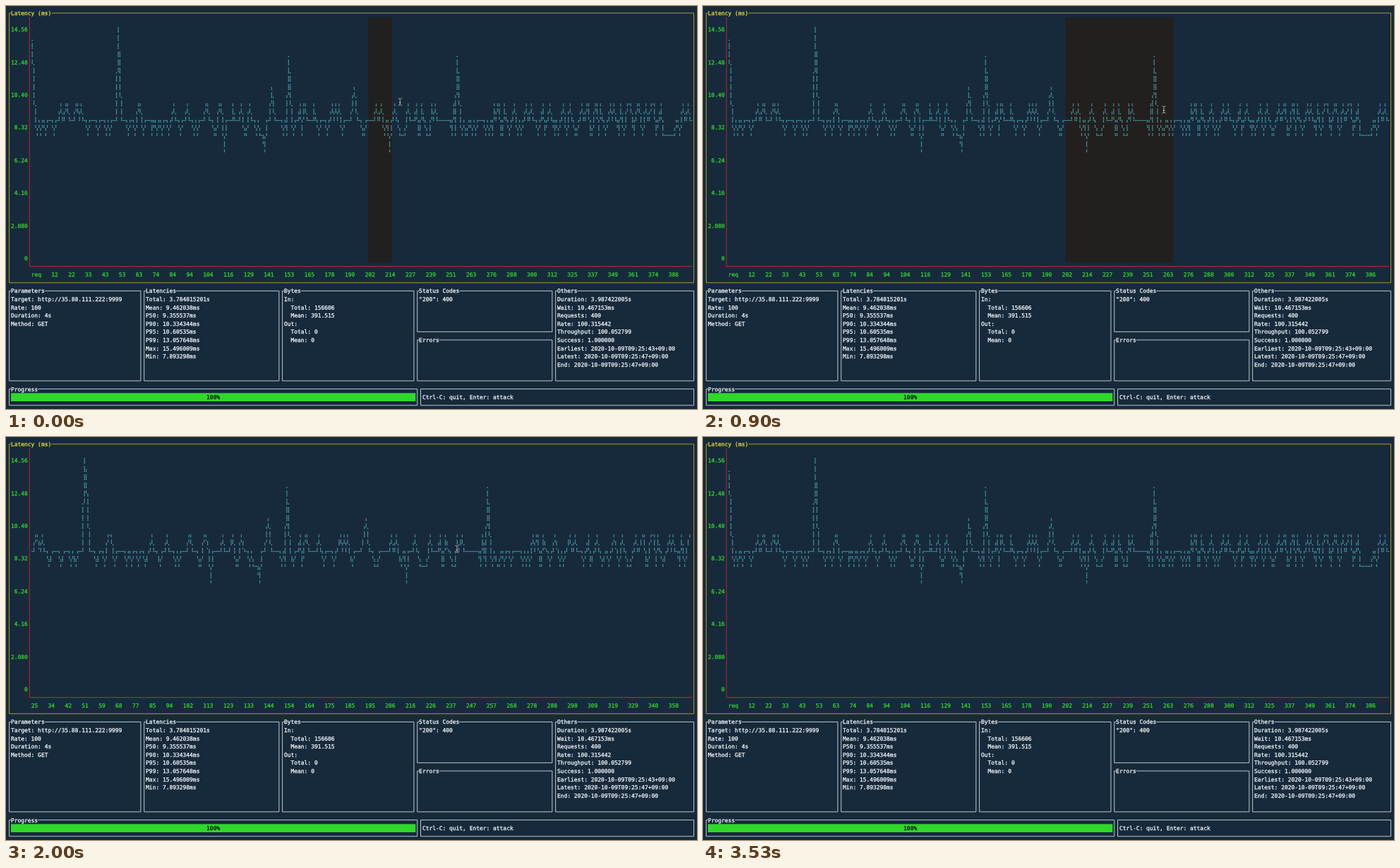
An HTML page that plays this animation: 979x572 px, repeating every 3.56 s.

```html
<!DOCTYPE html>
<html lang="en">
<head>
<meta charset="utf-8">
<title>Load test dashboard</title>
<style>
  html, body { margin: 0; width: 100%; height: 100%; overflow: hidden; background: #172a3c; }
  svg { display: block; width: 979px; height: 572px; }
  text {
    font: 7.937px "DejaVu Sans Mono", monospace;
    white-space: pre;
    text-rendering: geometricPrecision;
    stroke-width: .28px;
  }
  .white { fill: #f4f6f7; stroke: #f4f6f7; }
  .green { fill: #35d52f; stroke: #35d52f; }
  .yellow { fill: #e3dc35; stroke: #e3dc35; }
  .black { fill: #04120a; stroke: #04120a; }
  .line { fill: none; stroke: #c8d0d6; stroke-width: .95; }
  .line.gold { stroke: #b5a521; }
  .line.red { stroke: #a22b2e; stroke-width: 1.1; }
  #dots { fill: none; stroke: #5ac6ce; stroke-width: 1.5; stroke-linecap: round; }
  #cursor { fill: none; stroke: #cfd3d4; stroke-width: .9; }
  #cursor .halo { stroke: #0d1318; stroke-width: 2; }
</style>
</head>
<body>
<svg viewBox="0 0 979 572" xmlns="http://www.w3.org/2000/svg">
  <defs>
    <path id="beam" d="M-2.6-5Q-.4-5 0-3.6Q.4-5 2.6-5M0-3.6V3.8M-2.6 5Q-.4 5 0 3.8Q.4 5 2.6 5M-1.4 1.2H1.4"/>
  </defs>
  <g id="panels"></g>
  <rect id="selection" fill="#22201f"/>
  <path id="dots"/>
  <g id="axes"></g>
  <g id="ticks"></g>
  <g id="cursor"><use href="#beam" class="halo"/><use href="#beam"/></g>
</svg>
<script>
const LOOP = 3560, CW = 4.778, RH = 11.6, LEFT = 7, CELLS = 196;
const $ = id => document.getElementById(id);
const colX = c => 2.2 + c * CW;
const midX = c => colX(c + .5);
const rowY = r => 10 + r * RH;

function add(parent, tag, attrs, content) {
  const el = document.createElementNS('http://www.w3.org/2000/svg', tag);
  for (const k in attrs) el.setAttribute(k, attrs[k]);
  if (content) el.textContent = content;
  parent.appendChild(el);
}
const write = (parent, col, row, str, cls = 'white') =>
  add(parent, 'text', { x: colX(col), y: rowY(row) + 2.9, class: cls }, str);

// Terminal panels
const panels = $('panels');
function panel(c0, r0, c1, r1, title = '', lines = [], gold = false) {
  const x0 = midX(c0), x1 = midX(c1), y0 = rowY(r0), y1 = rowY(r1);
  const gap = title ? `H${colX(c0 + 1)}M${colX(c0 + 1 + title.length)} ${y0}` : '';
  add(panels, 'path', { class: gold ? 'line gold' : 'line', d: `M${x0} ${y0}${gap}H${x1}V${y1}H${x0}V${y0}` });
  if (title) write(panels, c0 + 1, r0, title, gold ? 'yellow' : 'white');
  lines.forEach((s, i) => write(panels, c0 + 1, r0 + 1 + i, s));
}
panel(0, 0, 203, 33, 'Latency (ms)', [], true);
panel(0, 34, 39, 45, 'Parameters', ['Target: http://35.88.111.222:9999', 'Rate: 100', 'Duration: 4s', 'Method: GET']);
panel(40, 34, 80, 45, 'Latencies', ['Total: 3.784815201s', 'Mean: 9.462038ms', 'P50: 9.355537ms',
  'P90: 10.334344ms', 'P95: 10.60535ms', 'P99: 13.057648ms', 'Max: 15.496009ms', 'Min: 7.893298ms']);
panel(81, 34, 120, 45, 'Bytes', ['In:', '  Total: 156606', '  Mean: 391.515', 'Out:', '  Total: 0', '  Mean: 0']);
panel(121, 34, 161, 39, 'Status Codes', ['"200": 400']);
panel(121, 40, 161, 45, 'Errors');
panel(162, 34, 203, 45, 'Others', ['Duration: 3.987422005s', 'Wait: 10.467153ms', 'Requests: 400',
  'Rate: 100.315442', 'Throughput: 100.052799', 'Success: 1.000000', 'Earliest: 2020-10-09T09:25:43+09:00',
  'Latest: 2020-10-09T09:25:47+09:00', 'End: 2020-10-09T09:25:47+09:00']);
panel(0, 46, 121, 48, 'Progress');
panel(122, 46, 203, 48);
write(panels, 123, 47, 'Ctrl-C: quit, Enter: attack');
add(panels, 'rect', { x: colX(1), y: rowY(46.5), width: 120 * CW, height: RH, fill: '#30d82b' });
write(panels, 59, 47, '100%', 'black');

add($('axes'), 'path', { class: 'line red', d: `M${midX(6)} ${rowY(.5)}V${rowY(31)}H${colX(203)}` });
for (let i = 0; i < 8; i++) {
  const s = i < 7 ? (2.08 * (7 - i)).toPrecision(i < 3 || i === 6 ? 4 : 3) : '0';
  write($('axes'), 6 - s.length, 2 + 4 * i, s, 'green');
}

// Latencies: 9 ms with random bumps and dips, denser towards the end
let seed = 7;
const rand = () => (seed = seed * 16807 % 2147483647) / 2147483647;
const data = Array(400).fill(9);
for (let i = 3; i < 399; i += 1 + Math.floor(rand() * (i < 270 ? 5.6 : 3.1))) {
  data[i] = rand() < .6 ? 8 : 10;
  if (rand() < .15) data[i + 1] = data[i];
}

// The stretch that gets magnified
data.fill(9, 204, 269);
for (const i of [208, 211, 220, 228, 233, 236, 242, 244, 255]) data[i] = 10;
for (const i of [213, 234, 235, 254, 256, 260, 262, 263, 266]) data[i] = 8;
data.fill(8, 223, 227);
data.fill(8, 239, 242);

// Spikes fall back over two requests
for (const [i, ms] of [[0, 14], [52, 15], [116, 7], [141, 7], [145, 11], [155, 13], [195, 11], [216, 7], [257, 13]]) {
  data[i] = ms;
  data[i + 1] = Math.max(9, Math.floor((ms + 9) / 2));
  data[i + 2] = 9;
}

// Axis step, rounded up to two significant decimals
function axisStep(range) {
  const raw = range / (2 * CELLS - 1), whole = Math.floor(raw), frac = raw - whole;
  const p = 10 ** (1 - Math.floor(Math.log10(frac)));
  return whole + Math.ceil(frac * p) / p;
}

function plot(from, to) {
  const step = axisStep(to - from), lit = new Set();
  const px = i => Math.round((i - from) / step), py = i => Math.round(data[i] / .13);
  for (let i = from; i < to; i++) {
    let x = px(i), y = py(i);
    const x1 = px(i + 1), y1 = py(i + 1), dx = x1 - x, dy = Math.abs(y1 - y), sy = Math.sign(y1 - y);
    let err = dx - dy;
    for (;;) {
      lit.add(x + y * 1000);
      if (x === x1 && y === y1) break;
      const e = 2 * err;
      if (e > -dy) { err -= dy; x++; }
      if (e < dx) { err += dx; y += sy; }
    }
  }
  let d = '';
  for (const k of lit) {
    const x = k % 1000, y = Math.floor(k / 1000);
    const cx = colX(LEFT) + (x + .5) * CW / 2 + .3;
    const cy = rowY(30 - (y >> 2)) + (1.5 - y % 4) * 2.15 + .6;
    d += `M${cx.toFixed(2)} ${cy.toFixed(2)}h.01`;
  }
  $('dots').setAttribute('d', d);

  const ticks = $('ticks');
  ticks.textContent = '';
  for (let cell = 0; ;) {
    const s = String(Math.round(from + step * 2 * cell) || 'req');
    if (cell + s.length > CELLS) break;
    write(ticks, LEFT + cell, 32, s, 'green');
    cell += s.length + 3;
  }
}

// Drag-zoom at 1 s, then wheel steps back out
function view(t) {
  if (t < 1000) return [0, 399];
  const k = Math.floor(Math.min((t - 1475) / 30, 17 + Math.max(0, (t - 2015) / 60)));
  if (k <= 0) return [204, 268];
  if (k >= 20) return [0, 399];
  const g = (64 * (335 / 64) ** (k / 17) - 64) / 271;
  return [Math.max(0, Math.round(204 - 179 * g)), Math.min(399, Math.round(268 + 92 * g))];
}

// Cursor key points: time, x, y
const path = [[0, 558, 136], [300, 627, 137], [480, 664, 140], [650, 664, 142], [900, 653, 147],
  [1080, 639, 159], [2750, 639, 159], [3080, 655, -10], [LOOP, 655, -10]];
function cursorAt(t) {
  const n = path.findIndex(p => p[0] > t), a = path[n - 1], b = path[n];
  const u = (t - a[0]) / (b[0] - a[0]);
  return [a[1] + (b[1] - a[1]) * u, a[2] + (b[2] - a[2]) * u];
}

const sel = $('selection');
sel.setAttribute('x', colX(107));
sel.setAttribute('y', rowY(.5));
sel.setAttribute('height', 30 * RH);

let shown = '';
function frame() {
  const t = performance.now() % LOOP, v = view(t);
  if (String(v) !== shown) {
    shown = String(v);
    plot(...v);
  }
  sel.setAttribute('width', t < 1000 ? Math.min(32, Math.floor(7 + t * .0545)) * CW : 0);
  $('cursor').setAttribute('transform', `translate(${cursorAt(t)})`);
  requestAnimationFrame(frame);
}
frame();
</script>
</body>
</html>
```
